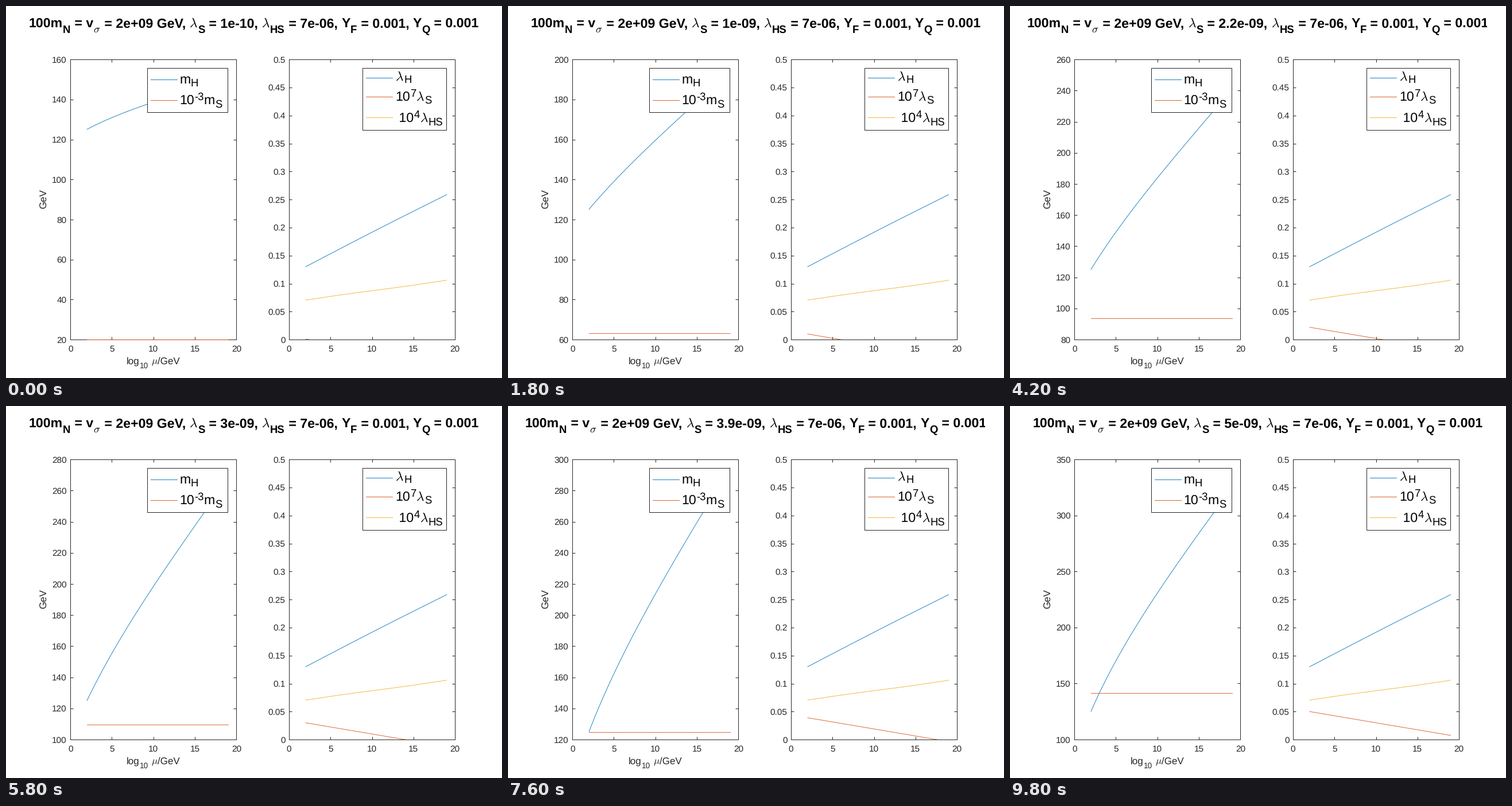
These frames come from a looping animation (864 by 648 pixels, 10000 ms). A matplotlib script:

```python
import numpy as np
import matplotlib.pyplot as plt
from matplotlib.animation import FuncAnimation
from matplotlib.lines import Line2D
from matplotlib.patches import Rectangle
from matplotlib.transforms import Bbox, IdentityTransform

W, H = 864, 648
FRAMES, STEP_MS = 50, 200
BLUE, ORANGE, YELLOW = "#0072BD", "#D95319", "#EDB120"
INK = "#262626"
TICK, LABEL, BIG = 15.4, 17, 23.14
SUB = 0.8
LAM, SIG, MU = r"$\lambda$", r"$\sigma$", r"$\mu$"

plt.rcParams.update({
    "font.family": "Liberation Sans",
    "font.size": TICK,
    "text.hinting": "none",
    "axes.linewidth": 1,
    "axes.edgecolor": INK,
})

fig = plt.figure(figsize=(W / 72, H / 72), dpi=72, facecolor="white")
PIXELS = IdentityTransform()
widths = {}


def put(x, y, s, size, **kw):
    """Text at pixel (x, y), with y measured downwards."""
    return fig.text(x, H - y, s, fontsize=size, transform=PIXELS,
                    math_fontfamily="cm", **kw)


def extent(s, size, weight):
    t = put(0, 0, s, size, weight=weight)
    w = t.get_window_extent().width
    t.remove()
    return w


def advance(s, size, weight):
    key = s, size, weight
    if key not in widths:
        if s.startswith("$"):
            widths[key] = extent(s, size, weight)
        else:
            # bars keep leading and trailing spaces in the measure
            widths[key] = (extent("|" + s + "|", size, weight)
                           - extent("||", size, weight))
    return widths[key]


def rich(x, y, parts, size, drop, rise=0, weight="normal", center=False,
         pad=0, **kw):
    """Row of parts; a leading '_' lowers and '^' raises a part."""
    row = []
    pos = 0
    for part in parts:
        shift, fs, gap = 0, size, 0
        if part[0] in "_^":
            shift = drop if part[0] == "_" else -rise
            part, fs, gap = part[1:], size * SUB, pad
        wt = "normal" if part.startswith("$") else weight
        row.append((pos, shift, part, fs, wt))
        pos += advance(part, fs, wt) + gap
    if center:
        x -= pos / 2
    return [put(x + dx, y + dy, s, fs, weight=wt, **kw)
            for dx, dy, s, fs, wt in row]


def make_axes(x0, x1, y0=93.1, y1=581.1):
    ax = fig.add_axes([x0 / W, 1 - y1 / H, (x1 - x0) / W, (y1 - y0) / H])
    ax.set_xlim(0, 20)
    ax.set_xticks(range(0, 21, 5))
    ax.tick_params(direction="in", length=5, width=1, top=True, right=True,
                   color=INK, labelcolor=INK, labelsize=TICK)
    ax.tick_params(axis="x", pad=9.5)
    ax.tick_params(axis="y", pad=6.5)
    return ax


def set_y(ax, lo, hi, step):
    ticks = lo + step * np.arange(round((hi - lo) / step) + 1)
    ax.set_ylim(lo, hi)
    ax.set_yticks(ticks, [f"{v:g}" for v in ticks])


def curve(ax, y, color, **kw):
    return ax.plot(x, y, color=color, lw=0.85, zorder=3, **kw)[0]


def legend_box(x0, x1, y0, y1, samples):
    fig.add_artist(Rectangle((x0, H - y1), x1 - x0, y1 - y0, fc="white",
                             ec=INK, lw=1, transform=PIXELS))
    for y, color in samples:
        fig.add_artist(Line2D([x0 + 6, x0 + 52], [H - y] * 2, color=color,
                              lw=0.9, transform=PIXELS))


x = np.linspace(2, 19, 120)
d = x - 2

left = make_axes(112.2, 401.3)
right = make_axes(493, 782)
set_y(right, 0, 0.5, 0.05)

higgs = curve(left, 0 * x, BLUE)
scalar = curve(left, 0 * x, ORANGE, clip_on=False)
curve(right, 0.13 + 0.00757 * d + 0.001 * np.sin(np.pi * d / 17), BLUE)
quartic = curve(right, 0 * x, ORANGE)
curve(right, 0.0704 + 0.0356 * d / 17
      + 0.0005 * np.sin(2 * np.pi * d / 17), YELLOW)

rich(210, 623.5, ["log", "_10", " ", MU, "/GeV"], LABEL, 7, color=INK)
put(66.2, 335.8, "GeV", LABEL, color=INK, rotation=90, ha="center",
    va="center")

legend_box(246, 386, 108, 185, [(128, BLUE), (164, ORANGE)])
rich(302.5, 134.6, ["m", "_H"], BIG, 5.5)
rich(302.5, 171.2, ["10", "^-3", "m", "_S"], BIG, 5.5, 7)

legend_box(621, 767, 108, 216, [(125, BLUE), (158, ORANGE), (194, YELLOW)])
rich(678.3, 129.2, [LAM, "_H"], BIG, 4.5)
rich(678.3, 164.7, ["10", "^7", LAM, "_S"], BIG, 5.5, 7)
rich(678.3, 202, [" 10", "^4", LAM, "_HS"], BIG, 5.5, 7)

title_clip = Bbox.from_extents(30, 0, 831, H)
title = []


def mass(n):
    base = d * (460 - 15.5 * d + 0.36 * d ** 2)
    growth = d * (77.3 + 1.08 * d + 0.014 * d ** 2)
    return np.sqrt(125.1 ** 2 + base + n * growth)


def limits(lo, hi):
    for step in (20, 50):
        a = step * np.floor(lo / step + 1e-9)
        b = step * np.ceil(hi / step - 1e-9)
        if b - a <= 10 * step:
            break
    return a, b, step


def draw(i):
    n = i + 1
    m_h = mass(n)
    m_s = 2e6 * np.sqrt(n * 1e-10)
    higgs.set_ydata(m_h)
    scalar.set_ydata(np.full_like(x, m_s))
    quartic.set_ydata(0.001 * n - 0.0025 * d)
    set_y(left, *limits(min(m_s, m_h[0]), max(m_s, m_h[-1])))

    for t in title:
        t.remove()
    title[:] = rich(
        431.5, 37,
        ["100m", "_N", " = v", "_" + SIG, " = 2e+09 GeV, ",
         LAM, "_S", f" = {n * 1e-10:.2g}, ", LAM, "_HS", " = 7e-06, ",
         "Y", "_F", " = 0.001, ", "Y", "_Q", " = 0.001"],
        BIG, 10, weight="bold", center=True, pad=0.5,
        clip_box=title_clip, clip_on=True)
    return [higgs, scalar, quartic, *title]


anim = FuncAnimation(fig, draw, frames=FRAMES, interval=STEP_MS,
                     repeat=True, repeat_delay=0, blit=False)
plt.show()
```
